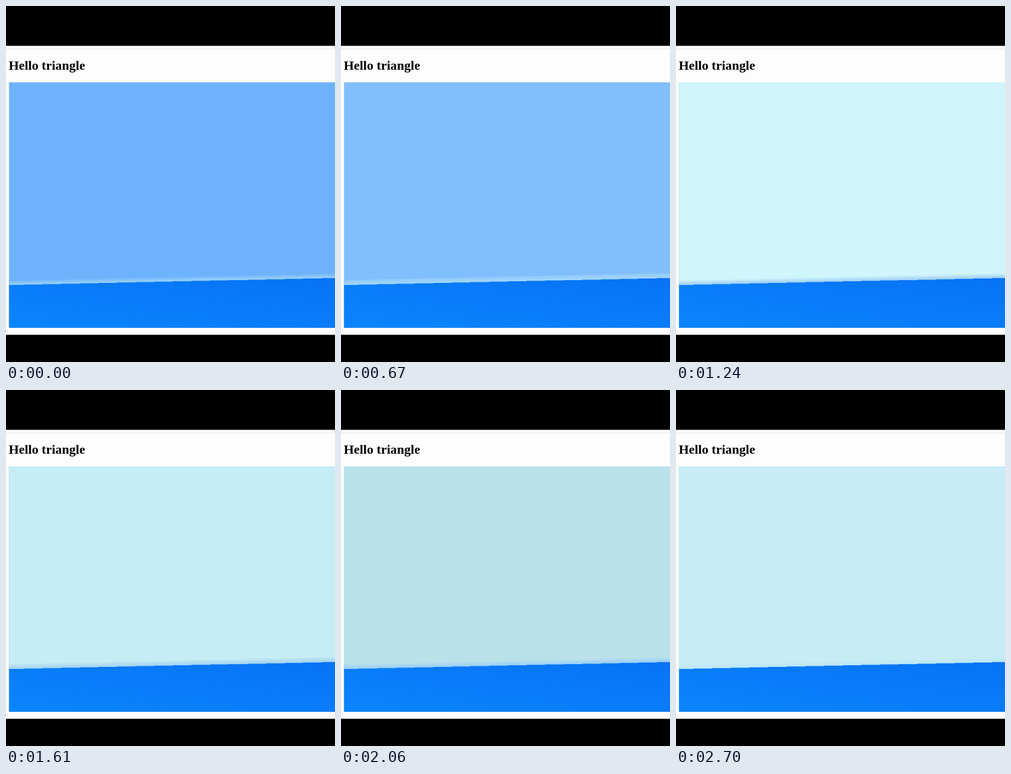
These frames come from a looping animation (600 px wide and 648 px high, 2.73 s). An HTML page with a canvas:

```html
<!DOCTYPE html>
<html lang="en">
<head>
<meta charset="utf-8">
<style>
  html, body { margin: 0; width: 100%; height: 100%; overflow: hidden; background: #000; }
  canvas { display: block; }
</style>
</head>
<body>
<canvas id="stage" width="600" height="648"></canvas>
<script>
const ctx = document.getElementById('stage').getContext('2d');
const LOOP = 2730;
const LEFT = 5.5, TOP = 139, RIGHT = 600, BOTTOM = 585.7;
const HORIZON = 508, TILT = -13 / 595, STEP = 34;

const moods = [
  { at: 460, sky: '#6fb2fc', haze: '#92cdfd' },
  { at: 1240, sky: '#d0f5fc', haze: '#a6d4f6' },
  { at: 2060, sky: '#bae0ea', haze: '#9ed2f7' },
  { at: 2700, sky: '#c7ecf5', haze: '#bce6f6' }
];

const clamp = u => Math.min(1, Math.max(0, u));
const smooth = u => u * u * (3 - 2 * u);

function rect(fill, x, y, w, h) {
  ctx.fillStyle = fill;
  ctx.fillRect(x, y, w, h);
}

function gradient(x0, y0, x1, y1, from, to) {
  const g = ctx.createLinearGradient(x0, y0, x1, y1);
  g.addColorStop(0, from);
  g.addColorStop(1, to);
  return g;
}

function drawSky({ sky, haze }, alpha) {
  ctx.save();
  ctx.globalAlpha = alpha;
  rect(sky, LEFT, TOP, RIGHT - LEFT, BOTTOM - TOP);
  ctx.transform(1, TILT, 0, 1, LEFT, HORIZON);
  rect(gradient(0, -9, 0, -2, sky, haze), 0, -9, RIGHT - LEFT, 12);
  ctx.restore();
}

// The horizon is a staircase of short level runs
function drawWater() {
  ctx.beginPath();
  ctx.moveTo(LEFT, BOTTOM);
  for (let x = -2; x < RIGHT; x += STEP) {
    const y = HORIZON + TILT * (x + STEP / 2 - LEFT);
    ctx.lineTo(Math.max(x, LEFT), y);
    ctx.lineTo(x + STEP, y);
  }
  ctx.lineTo(RIGHT, BOTTOM);
  ctx.fillStyle = gradient(5, 592, 31, 416, '#0a86fc', '#0873f6');
  ctx.fill();
}

function draw(t) {
  rect('#000', 0, 0, 600, 648);
  rect('#fefdfe', 0, 72.5, 600, 526);
  rect('#e2e2e2', 0, 78, 600, 1);
  ctx.fillStyle = '#000';
  ctx.font = 'bold 23.75px "Liberation Serif", "Times New Roman", serif';
  ctx.fillText('Hello triangle', 5, 116);

  // Cross-fade from each mood to the next
  drawSky(moods[0], 1);
  for (let i = 1; i < moods.length; i++) {
    const start = moods[i - 1].at;
    drawSky(moods[i], smooth(clamp((t - start) / (moods[i].at - start))));
  }
  drawWater();
}

function tick() {
  draw(performance.now() % LOOP);
  requestAnimationFrame(tick);
}
tick();
</script>
</body>
</html>
```
